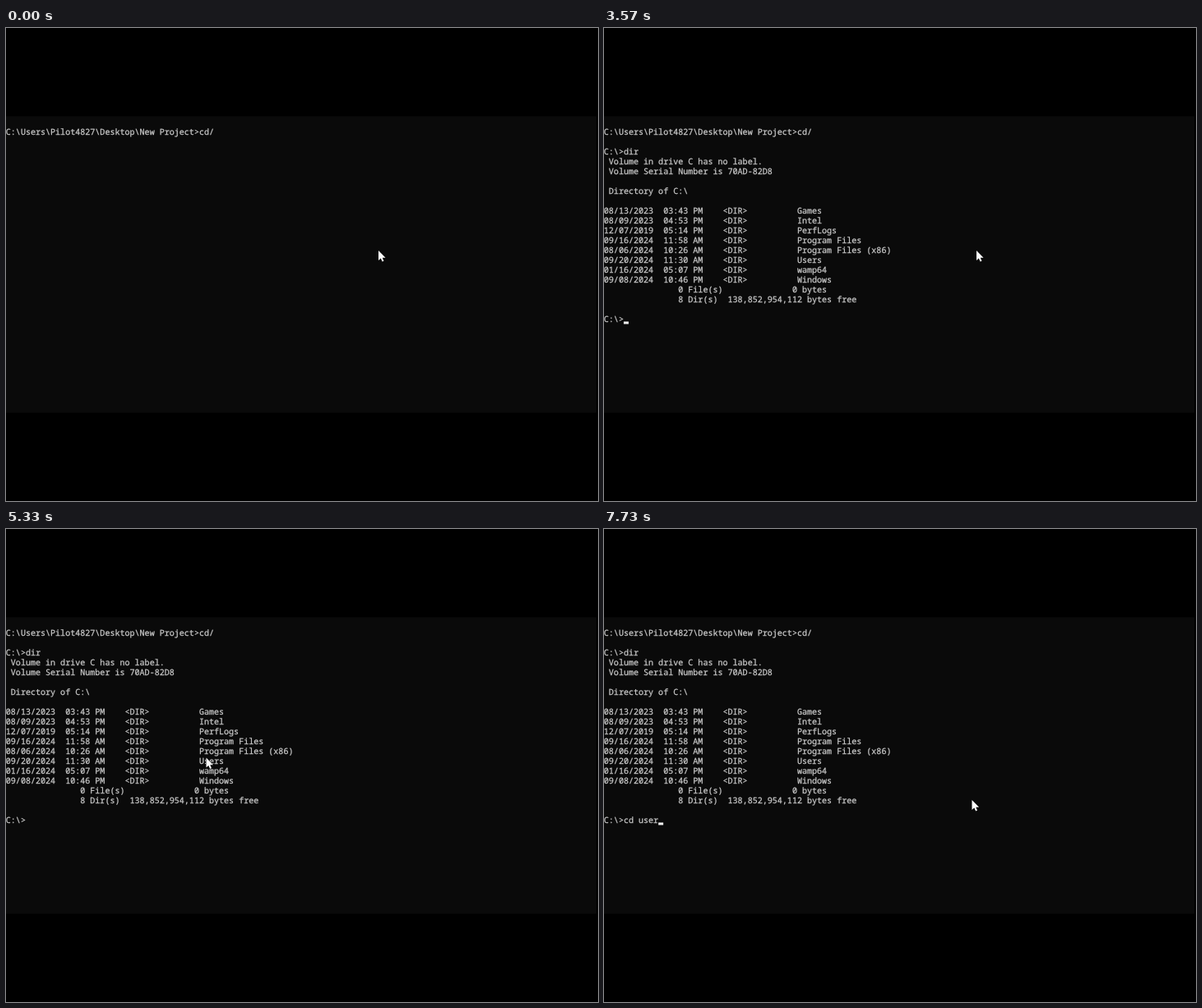
An HTML page that plays this animation: 720x576 px, repeating every 8 s.

```html
<!DOCTYPE html>
<html lang="en">
<head>
<meta charset="utf-8">
<title>Terminal session</title>
<style>
  html, body { margin: 0; width: 100%; height: 100%; overflow: hidden; background: #000; }
  svg { display: block; width: 720px; height: 576px; }
  text {
    font: 10.05px "Noto Sans Mono", "DejaVu Sans Mono", monospace;
    fill: #ccc;
    stroke: #ccc;
    stroke-width: .25px;
    white-space: pre;
    text-rendering: geometricPrecision;
  }
</style>
</head>
<body>
<svg viewBox="0 0 720 576">
  <rect y="107.5" width="718" height="361" fill="#0a0a0a"/>
  <g id="screen"></g>
  <rect id="caret" width="6" height="3" fill="#f2f2f2"/>
  <path id="mouse" d="M0 0V12L2.8 9.5 4.6 13.6 6.5 12.8 4.8 8.8H8.6Z"
        fill="#fff" stroke="#000" stroke-width="1" paint-order="stroke"/>
</svg>
<script>
const LOOP = 8000, BLINK = 530, BLINK_START = 70;
const LEFT = -0.2, COL = 6.03, ROW = 12.03, BASE = 129.7, CARET_TOP = 128.9;
const ENTER_CD = 330, ENTER_DIR = 3570;

const $ = id => document.getElementById(id);
const screen = $('screen'), caret = $('caret'), mouse = $('mouse');

const folder = (date, name) => date + '    <DIR>          ' + name;
const listing = [
  ' Volume in drive C has no label.',
  ' Volume Serial Number is 70AD-82D8',
  '',
  ' Directory of C:\\',
  '',
  folder('08/13/2023  03:43 PM', 'Games'),
  folder('08/09/2023  04:53 PM', 'Intel'),
  folder('12/07/2019  05:14 PM', 'PerfLogs'),
  folder('09/16/2024  11:58 AM', 'Program Files'),
  folder('08/06/2024  10:26 AM', 'Program Files (x86)'),
  folder('09/20/2024  11:30 AM', 'Users'),
  folder('01/16/2024  05:07 PM', 'wamp64'),
  folder('09/08/2024  10:46 PM', 'Windows'),
  ' '.repeat(15) + '0 File(s)' + ' '.repeat(14) + '0 bytes',
  ' '.repeat(15) + '8 Dir(s)  138,852,954,112 bytes free',
  ''
];

// Every event appends text at its time; a line break is the Enter key.
const type = (str, start, gap) =>
  [...str].map((text, i) => ({ at: start + i * gap, text }));
const events = [
  { at: -LOOP, text: 'C:\\Users\\Pilot4827\\Desktop\\New Project>cd/' },
  { at: ENTER_CD, text: '\n\nC:\\>' },
  ...type('dir', 2800, 200),
  { at: ENTER_DIR, text: '\n' + listing.join('\n') + '\nC:\\>' },
  ...type('cd ', 6530, 250),
  ...type('user', 7400, 110)
];

// Pointer: across to the list, down it, back up a little, then away.
const home = { x: 453, y: 271 };
const moves = [
  { from: 4140, to: 4540, x: 243, y: 238 },
  { from: 4540, to: 4800, x: 239, y: 302 },
  { from: 4800, to: 5130, x: 243.5, y: 278.5 },
  { from: 5570, to: 6100, x: 447.5, y: 330 }
];

const tick = t => Math.floor((t - BLINK_START) / BLINK);
const smooth = k => k * k * (3 - 2 * k);

function pointer(t) {
  let { x, y } = home;
  for (const m of moves) {
    const k = smooth(Math.min(1, Math.max(0, (t - m.from) / (m.to - m.from))));
    x += (m.x - x) * k;
    y += (m.y - y) * k;
  }
  return `translate(${x} ${y})`;
}

// The caret stays lit after a key until the second blink tick.
const lit = (t, key) => tick(t) - tick(key) < 2 || tick(t) % 2 === 0;

function showText(lines) {
  screen.replaceChildren(...lines.map((str, row) => {
    const el = document.createElementNS('http://www.w3.org/2000/svg', 'text');
    el.setAttribute('x', LEFT);
    el.setAttribute('y', BASE + row * ROW);
    el.textContent = str;
    return el;
  }));
  caret.setAttribute('x', LEFT + lines.at(-1).length * COL);
  caret.setAttribute('y', CARET_TOP + (lines.length - 1) * ROW);
}

let shown = 0;
function draw(t) {
  const past = events.filter(e => e.at <= t);
  if (past.length !== shown) {
    shown = past.length;
    showText(past.map(e => e.text).join('').split('\n'));
  }
  caret.style.display = lit(t, past.at(-1).at) ? '' : 'none';
  mouse.setAttribute('transform', pointer(t));
}

const start = performance.now();
function loop() {
  draw((performance.now() - start) % LOOP);
  requestAnimationFrame(loop);
}
loop();
</script>
</body>
</html>
```
